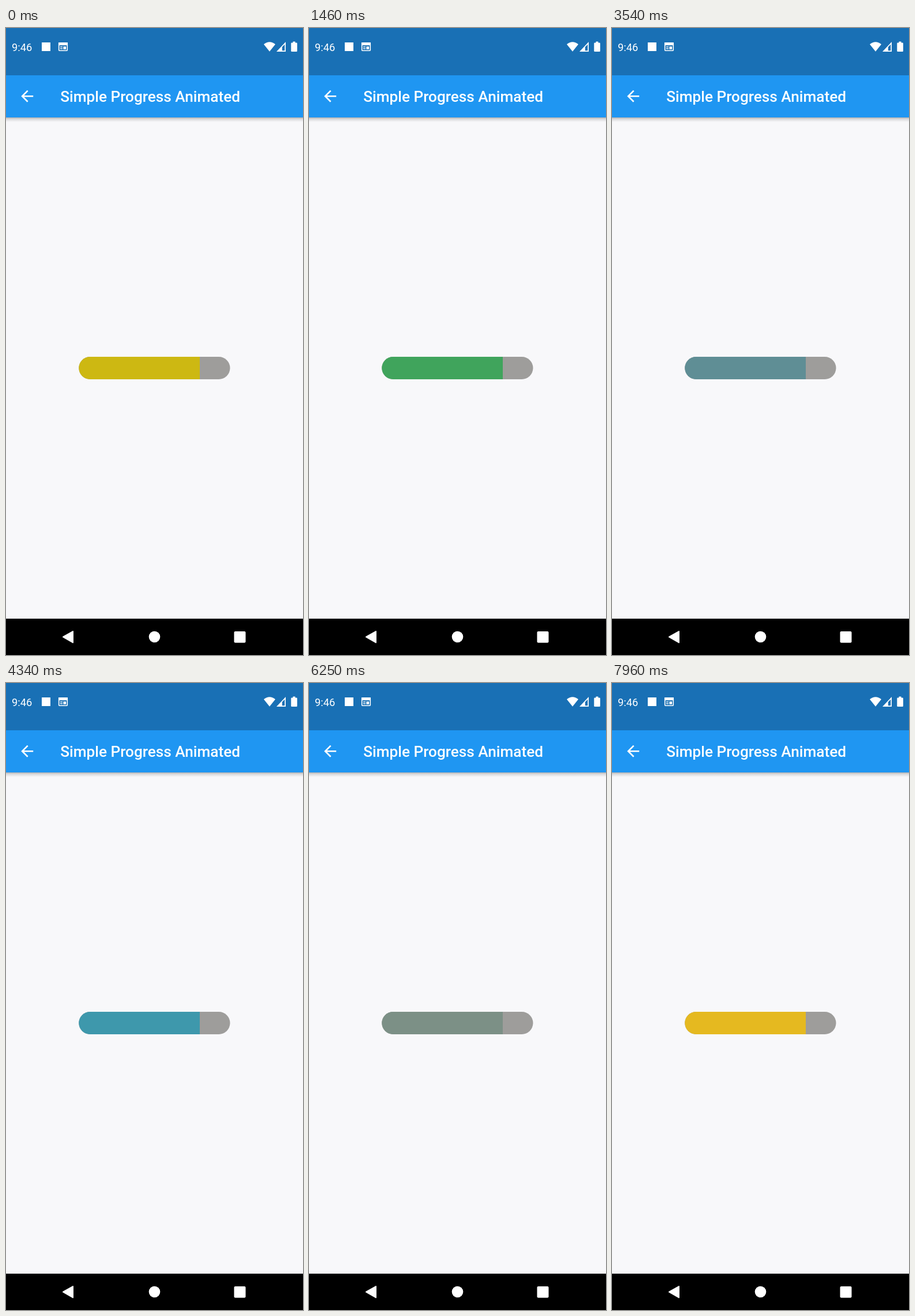
An HTML page for the animation above (8 s loop, 515 px wide and 1087 px high).

```html
<!DOCTYPE html>
<html lang="en">
<head>
<meta charset="utf-8">
<title>Simple Progress Animated</title>
<style>
  html, body { margin: 0; width: 100%; height: 100%; overflow: hidden; background: #f8f8fa; }
  svg { display: block; width: 100%; height: 100%; }
  text { font-family: Roboto, sans-serif; fill: #fff; }
</style>
</head>
<body>
<svg viewBox="0 0 515 1087">
  <defs>
    <linearGradient id="shade" x2="0" y2="1">
      <stop offset="0" stop-color="#000" stop-opacity=".36"/>
      <stop offset=".4" stop-color="#000" stop-opacity=".13"/>
      <stop offset="1" stop-color="#000" stop-opacity="0"/>
    </linearGradient>
    <clipPath id="pill"><rect x="126.3" y="570" width="262.2" height="39" rx="19.5"/></clipPath>
  </defs>

  <rect width="515" height="1087" fill="#f8f8fa"/>
  <rect y="154" width="515" height="9" fill="url(#shade)"/>
  <rect y="81" width="515" height="74" fill="#1f96f2"/>
  <rect width="515" height="82" fill="#1970b5"/>

  <!-- status bar -->
  <g fill="#fff">
    <text x="10" y="39.5" font-size="18.3">9:46</text>
    <rect x="62" y="25" width="15" height="15"/>
    <rect x="91.7" y="26.5" width="14.6" height="12.8" rx="1" fill="none" stroke="#fff" stroke-width="1.6"/>
    <path d="M91 25h16v5h-16zM94 32h4v1.4h-4zM94 35h4v1.4h-4zM99.5 32h4.5v5h-4.5z"/>
    <path d="M447 28.3Q457 20 467 28.3L457 40.8z"/>
    <path fill-rule="evenodd" d="M485 24V41H469zM483.3 28.4L478.8 33V39.2H483.3z"/>
    <path d="M497.5 23.5h4v2h2.2q1.2 0 1.2 1.2v13q0 1.3-1.2 1.3h-8.2q-1.2 0-1.2-1.3v-13q0-1.2 1.2-1.2h2z"/>
  </g>

  <!-- title bar -->
  <path transform="translate(21 102.5) scale(1.31)" fill="#fff"
    d="M20 11H7.83l5.59-5.59L12 4l-8 8 8 8 1.41-1.41L7.83 13H20z"/>
  <text x="94.2" y="128" font-size="26.2" font-weight="500">Simple Progress Animated</text>

  <g clip-path="url(#pill)">
    <rect x="126" y="570" width="263" height="39" fill="#9e9d9b"/>
    <rect id="fill" x="126" y="570" width="210" height="39"/>
  </g>

  <!-- navigation bar -->
  <rect y="1024" width="515" height="63" fill="#000"/>
  <g fill="#fff">
    <path d="M99 1055.7L116 1046V1065.5z" stroke="#fff" stroke-width="2" stroke-linejoin="round"/>
    <circle cx="257.5" cy="1055.5" r="9.8"/>
    <rect x="395.5" y="1046" width="20" height="19.7" rx="2"/>
  </g>
</svg>
<script>
  const LOOP = 8000;
  // time in ms, red, green, blue
  const keys = [
    [0, 205, 184, 18],
    [1460, 64, 164, 92],
    [2790, 126, 132, 128],
    [4340, 62, 152, 172],
    [5290, 124, 148, 136],
    [7040, 124, 140, 132],
    [7960, 229, 185, 32],
    [LOOP, 229, 185, 32]
  ];
  const fill = document.getElementById("fill");

  function colorAt(t) {
    const i = keys.findIndex(k => k[0] > t);
    const [a, b] = [keys[i - 1], keys[i]];
    const p = (t - a[0]) / (b[0] - a[0]);
    const rgb = [1, 2, 3].map(c => Math.round(a[c] + (b[c] - a[c]) * p));
    return `rgb(${rgb})`;
  }

  function draw() {
    fill.setAttribute("fill", colorAt(performance.now() % LOOP));
    requestAnimationFrame(draw);
  }
  draw();
</script>
</body>
</html>
```
